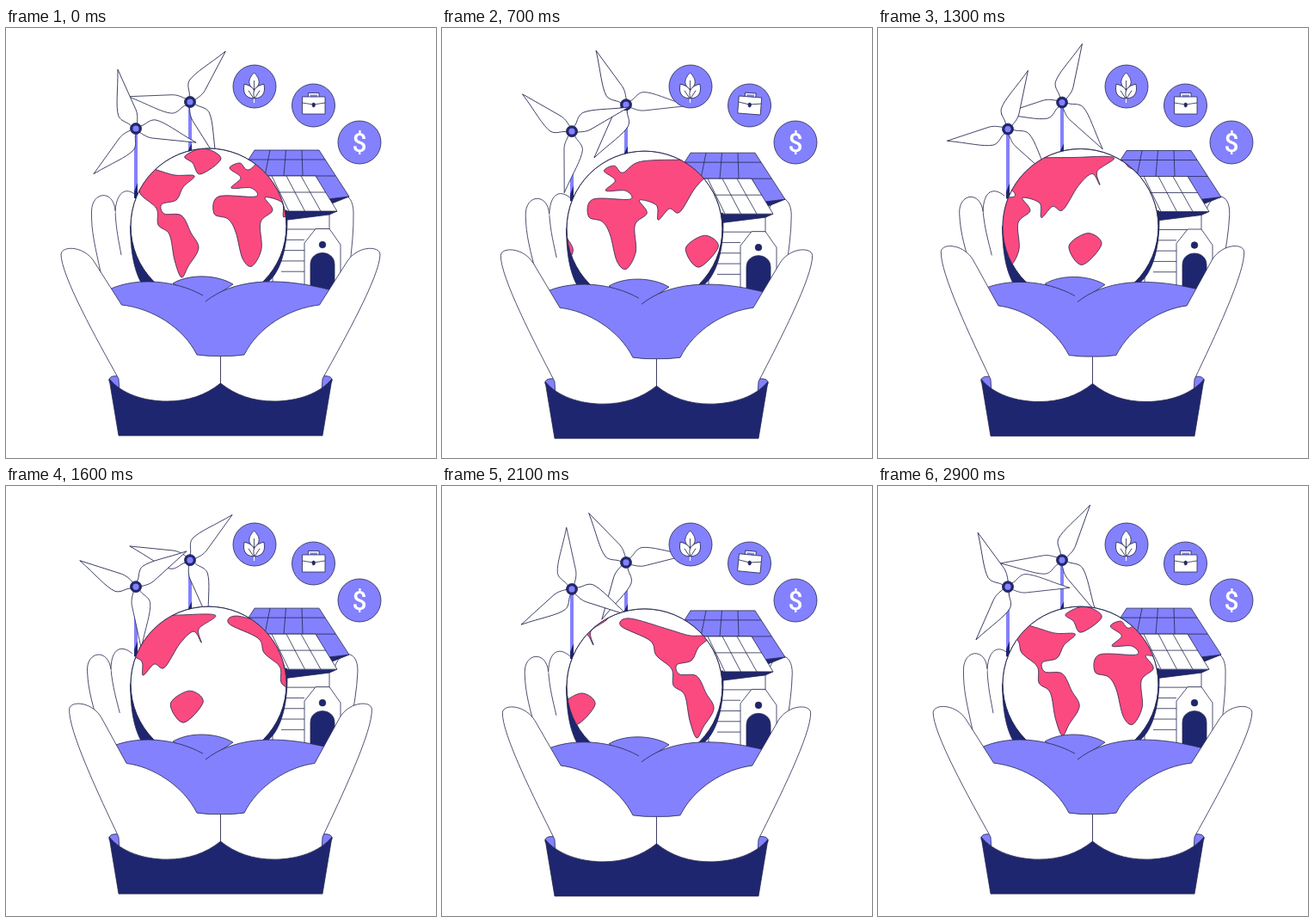
Animation, 500 px wide and 500 px high, one loop 3000 ms. Source, as an HTML page:

```html
<!DOCTYPE html>
<html lang="en">
<head>
<meta charset="utf-8">
<style>
  html, body { margin: 0; width: 100%; height: 100%; overflow: hidden; background: #fff; }
  svg { display: block; width: 100vw; height: 100vh; }
  .line { fill: none; }
  .white { fill: #fff; }
  .lilac { fill: #8381fd; }
  .navy { fill: #1f2670; }
  .land { fill: #fb4a7f; }
  .bare { stroke: none; }
  text { font: 500 30px Roboto, sans-serif; text-anchor: middle; }
</style>
</head>
<body>
<svg viewBox="0 0 500 500" stroke="#25274f" stroke-width=".8" stroke-linejoin="round">
  <defs>
    <clipPath id="disc"><circle cx="235.5" cy="230.5" r="90.5"/></clipPath>
    <path id="blade" class="white" d="M72 0C48-7 32-15 20-15C12-14 10-6 4-4L4 3C9 4 13 7 21 6.500Z"/>
    <g id="rotor">
      <use href="#blade"/>
      <use href="#blade" transform="rotate(120)"/>
      <use href="#blade" transform="rotate(240)"/>
    </g>
    <g id="hub">
      <circle class="navy" r="6.500"/>
      <circle class="lilac bare" r="3.600"/>
    </g>
    <g id="continents" class="land"></g>
    <g id="leaf">
      <path class="white" d="M0 0C-8-6-7-13 0-20C7-13 8-6 0 0Z"/>
      <path class="line" d="M0 0V-11"/>
    </g>
  </defs>

  <g id="scene">
    <g id="leftFingers" class="white">
      <path d="M134 264C131 247 128 235 127 213C129 187 142 185 153 196"/>
      <path d="M110 284C104 255 99 238 99.500 213C100 189 126 188 127 213"/>
    </g>
    <path id="rightFinger" class="white" d="M376 215C379 190 403 185 404 214C404.500 235 402 255 400 275"/>

    <g id="backTurbine">
      <path class="lilac bare" d="M212 86h4v60h-4z"/>
      <path class="navy bare" d="M212 142l4-8v10h-4z"/>
      <use class="rotor" href="#rotor"/>
      <use href="#hub" x="214" y="86"/>
    </g>
    <g id="frontTurbine">
      <path class="lilac bare" d="M149 117h4v80h-4z"/>
      <path class="navy bare" d="M149 190l4-10v18h-4z"/>
      <use class="rotor" href="#rotor"/>
      <use href="#hub" x="151" y="117"/>
    </g>

    <g id="house">
      <path class="white" d="M310 208H376V310H310Z"/>
      <path id="siding" class="line"/>
      <path class="navy" d="M318 213H385L376 217L320 224Z"/>
      <path class="white" d="M347 305V250L360 233.500H376L389 252V305Z"/>
      <circle class="navy" cx="368" cy="252" r="3.800"/>
      <path class="navy" d="M354 305V275C354 257 382 257 382 275V305Z"/>
      <path class="navy" d="M374 198L399 196L379 204Z"/>
      <path class="lilac" d="M289 142H364L399 196L374 199L360 172H270Z"/>
      <path class="line" d="M282 153H371M360 172H383"/>
      <path class="white" d="M292 172H360L385 213H310Z"/>
      <path class="line" d="M300 191H372"/>
      <path id="seams" class="line"/>
    </g>

    <path class="navy" d="M144.500 230C145 262 149 284 160 301L304 296C322 282 329 245 326.500 212Z"/>
    <circle class="white" cx="235.500" cy="230.500" r="90.500"/>
    <g clip-path="url(#disc)"><g id="globe">
      <use href="#continents"/>
      <use href="#continents" x="307"/>
    </g></g>
    <circle class="line" cx="235.500" cy="230.500" r="90.500"/>

    <path class="lilac" d="M194 297C212 286 244 286 264 298L230 320Z"/>
    <path class="lilac" d="M232 318C262 294 310 287 379 305L330 384H170L120 304C150 290 195 292 229 311"/>

    <g id="wrist">
      <path class="lilac" d="M120 411C119 405 125 404 132 405L136 424Z"/>
      <path id="hand" class="white"/>
    </g>
    <use href="#wrist" transform="matrix(-1 0 0 1 499 0)"/>
    <path class="navy" d="M120 408C134 425 160 434 187 434C212 434 232 427 249.500 413C267 427 287 434 312 434C339 434 365 425 379 408L368 474H131Z"/>
  </g>

  <g>
    <circle class="lilac" cx="289" cy="68" r="25"/>
    <circle class="lilac" cx="357.500" cy="90" r="25"/>
    <circle class="lilac" cx="411" cy="133" r="25"/>
    <path class="line" stroke="#fff" stroke-width="1.200" d="M288.500 66V87"/>
    <use href="#leaf" transform="translate(288.500 72)"/>
    <use href="#leaf" transform="translate(288 82) rotate(-33)"/>
    <use href="#leaf" transform="translate(289 82) rotate(33)"/>
    <g id="briefcase">
      <path class="line" stroke="#fff" stroke-width="1.800" d="M352.500 80V76.500H363V80"/>
      <path class="line" d="M351.500 80V75.500H364V80"/>
      <path class="white" d="M344.500 80H371V100H344.500Z"/>
      <path class="line" d="M344.500 87L357.500 89L371 87"/>
      <ellipse class="navy" cx="357.700" cy="89.500" rx="1.700" ry="2.400"/>
    </g>
    <text class="white bare" x="411" y="143.500">$</text>
  </g>
</svg>
<script>
const LOOP = 3000, STEP = 100, MAP_WIDTH = 307;
const $ = id => document.getElementById(id);

// Key points of each coastline, joined by smooth curves.
const coasts = {
  americas: '116,160 126,151 172,164 196,171 219,172 206,185 198,200 181,205 184,216 204,218 ' +
    '215,238 224,256 212,277 204,290 196,270 190,240 177,229 175,210 157,194 150,177',
  greenland: '208,149 230,140 250,152 226,170 217,157',
  oldWorld: '260,163 272,157 282,165 303,152 360,150 407,150 388,166 391,182 382,169 366,183 ' +
    '348,211 336,207 323,220 321,203 301,197 310,212 296,226 297,257 286,277 275,268 ' +
    '267,237 258,222 242,216 247,196 290,196 285,186 262,186 273,174',
  australia: '355,253 377,238 393,251 370,275',
};

// Closed Catmull-Rom curve.
function smooth(coast) {
  const points = coast.split(' ').map(pair => pair.split(',').map(Number));
  const at = i => points.at(i % points.length);
  return points.reduce((d, b, i) => {
    const a = at(i - 1), c = at(i + 1), e = at(i + 2);
    const leave = b.map((v, k) => v + (c[k] - a[k]) / 6);
    const arrive = c.map((v, k) => v - (e[k] - b[k]) / 6);
    return d + `C${leave} ${arrive} ${c}`;
  }, `M${points[0]}`) + 'Z';
}

const repeat = (count, piece) => Array.from({ length: count }, (_, i) => piece(i)).join('');

// Only the raised part of the hand turns; the palm stays put.
function handPath(angle) {
  const cos = Math.cos(angle), sin = Math.sin(angle);
  const p = (x, y) => {
    const dx = x - 131, dy = y - 408;
    return `${131 + dx * cos - dy * sin} ${408 + dx * sin + dy * cos} `;
  };
  return `M132 424L131 408C${p(106, 363)}${p(64, 288)}${p(64, 263)}` +
    `C${p(65, 253)}${p(90, 253)}${p(102, 271)}L${p(134.5, 322)}` +
    'C170 326 206 348 222 380Q236 382 249.5 381.500V414Q187 475 132 424';
}

function spin(id, x, y, angle) {
  document.querySelector(`#${id} .rotor`)
    .setAttribute('transform', `translate(${x} ${y}) rotate(${angle})`);
}

const bump = (t, from, to) =>
  t > from && t < to ? Math.sin(Math.PI * (t - from) / (to - from)) : 0;

function draw(t) {
  const phase = t / LOOP, wave = k => (1 - Math.cos(2 * Math.PI * k * phase)) / 2;
  const sway = 3.8 * wave(1);
  const move = (id, value) => $(id).setAttribute('transform', value);
  move('scene', `translate(0 ${3.2 * wave(2)})`);
  move('globe', `translate(${-MAP_WIDTH * phase} 0)`);
  move('leftFingers', `rotate(${-sway} 130 290)`);
  move('rightFinger', `rotate(${sway} 375 290)`);
  move('briefcase', `rotate(${7 * bump(t, 0, 900) + 6 * bump(t, 1700, 2800)} 357.500 90)`);
  spin('backTurbine', 214, 86, 65 + 240 * phase);
  spin('frontTurbine', 151, 117, 13 + 360 * phase);
  $('hand').setAttribute('d', handPath(sway * Math.PI / 180));
}

$('continents').innerHTML = Object.values(coasts)
  .map(coast => `<path d="${smooth(coast)}"/>`).join('');
$('siding').setAttribute('d', repeat(5, i => `M320 ${234 + 12.3 * i}H${i ? 347 : 376}`));
$('seams').setAttribute('d', repeat(3, i =>
  `M${307 + 18.5 * i} 142L${301 + 22 * i} 172M${309 + 17 * i} 172L${329 + 18.5 * i} 213`));

function tick() {
  draw(Math.floor(performance.now() / STEP) * STEP % LOOP);
  requestAnimationFrame(tick);
}
tick();
</script>
</body>
</html>
```
